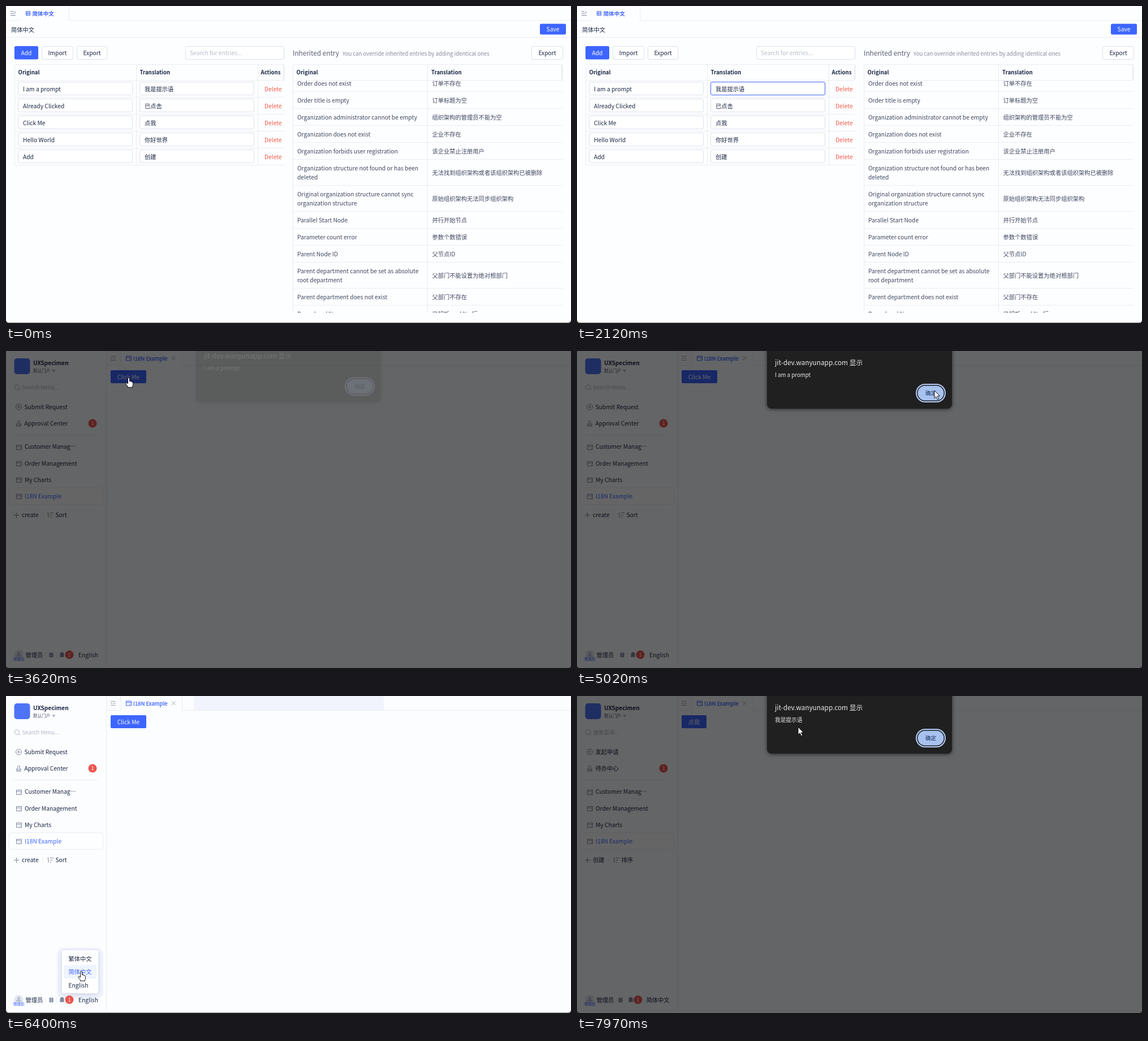
These frames come from a looping animation (999x561 px, 8000 ms). An HTML page:

```html
<!DOCTYPE html>
<html lang="zh-CN">
<head>
<meta charset="utf-8">
<style>
html, body { margin: 0; width: 100%; height: 100%; overflow: hidden; background: #222; }
svg { display: block; width: 999px; height: 561px; }
text { font-family: "Noto Sans CJK SC", "Noto Sans CJK", sans-serif; white-space: pre; }
</style>
</head>
<body>
<svg id="stage" viewBox="0 0 999 561"></svg>
<script>
const BLUE = '#3d65ff', INK = '#1b2644', CELL = '#3f475f', LINE = '#e9ecf3', EDGE = '#dde1ec', RED = '#ec5650', GREY = '#7f889f';

// yc is the middle of the capitals
const text = (x, yc, s, size = 10.27, fill = INK, extra = '') =>
  `<text x="${x}" y="${yc + size * .37}" font-size="${size}" fill="${fill}" ${extra}>${s}</text>`;
const bold = (x, yc, s, size, fill) => text(x, yc, s, size, fill, 'font-weight="700"');
const mid = (x, yc, s, size, fill) => text(x, yc, s, size, fill, 'text-anchor="middle"');
const rect = (x, y, w, h, fill, r = 0, extra = '') =>
  `<rect x="${x}" y="${y}" width="${w}" height="${h}" rx="${r}" fill="${fill}" ${extra}/>`;
const box = (x, y, w, h, stroke = EDGE, extra = '') =>
  rect(x + .5, y + .5, w - 1, h - 1, '#fff', 2.5, `stroke="${stroke}" ${extra}`);
const path = (d, stroke = GREY, w = 1, extra = '') =>
  `<path d="${d}" fill="none" stroke="${stroke}" stroke-width="${w}" ${extra}/>`;
const hline = (x1, x2, y) => path(`M${x1} ${y}H${x2}`, LINE);
const vline = (x, y1, y2) => path(`M${x} ${y1}V${y2}`, LINE);
const group = (id, body, extra = '') => `<g id="${id}" ${extra}>${body}</g>`;
const card = (x, y, c) => path(`M${x + .5} ${y - 4}h9v8h-9zM${x} ${y - 1.5}h10M${x + 6} ${y + 1.5}h2`, c);
const badge = (x, y) => `<circle cx="${x}" cy="${y}" r="7.5" fill="${RED}"/>` + mid(x, y, 1, 9, '#fff');

function editor() {
  const left = [['I am a prompt', '我是提示语'], ['Already Clicked', '已点击'], ['Click Me', '点我'],
    ['Hello World', '你好世界'], ['Add', '创建']];
  const right = [['Order does not exist', '订单不存在'], ['Order title is empty', '订单标题为空'],
    ['Organization administrator cannot be empty', '组织架构的管理员不能为空'],
    ['Organization does not exist', '企业不存在'],
    ['Organization forbids user registration', '该企业禁止注册用户'],
    ['Organization structure not found or has been|deleted', '无法找到组织架构或者该组织架构已被删除'],
    ['Original organization structure cannot sync|organization structure', '原始组织架构无法同步组织架构'],
    ['Parallel Start Node', '并行开始节点'], ['Parameter count error', '参数个数错误'],
    ['Parent Node ID', '父节点ID'],
    ['Parent department cannot be set as absolute|root department', '父部门不能设置为绝对根部门'],
    ['Parent department does not exist', '父部门不存在'], ['Parsed and %s', '已解析 and %s 行']];

  let s = rect(0, 0, 999, 561, '#fdfeff');
  s += hline(0, 25, 25.5) + hline(111, 999, 25.5) + vline(111.5, 0, 25) + hline(0, 999, 55.5);
  s += path('M8 9.5h5M8 13h6M8 16.5h9M14.5 9.5l2.5 2-2.5 2');
  s += path('M35.5 9.5h7v7h-7zM37 11.5h2v3h-2zM40 12h2M40 14h2', BLUE);
  s += bold(46.5, 13, '简体中文', 9.6, BLUE) + text(9, 42, '简体中文');
  s += rect(944, 31.5, 46, 19, BLUE, 2.5) + mid(967, 41, 'Save', 10.27, '#fff');
  s += rect(15, 71, 42, 23.5, BLUE, 2.5) + mid(36, 83, 'Add', 10.27, '#fff');
  s += box(63, 71, 56, 24) + mid(91, 83, 'Import');
  s += box(125, 71, 54, 24) + mid(152, 83, 'Export');
  s += box(317, 71, 175, 24) + text(325, 83, 'Search for entries...', 10.27, '#b6bccb');
  s += text(507, 83.5, 'Inherited entry', 11.75, '#565d70');
  s += text(595, 84, 'You can override inherited entries by adding identical ones', 9.55, '#858b99');
  s += box(929, 71, 56, 24) + mid(957, 83, 'Export');

  s += path('M15.5 281V106q0-2.5 2.5-2.5H492', LINE) + hline(15, 492, 131.5);
  s += vline(230.5, 104, 281) + vline(445.5, 104, 281) + rect(490, 105, 2.5, 26, LINE, 1);
  s += bold(21.5, 117, 'Original', 9.6) + bold(236.5, 117, 'Translation', 9.6) + bold(450.5, 117, 'Actions', 9.6);
  left.forEach(([a, b], i) => {
    const y = 131 + i * 30;
    s += hline(15, 492, y + 30.5) + box(21, y + 3, 203, 24);
    s += box(236, y + 3, 203, 24, EDGE, i ? '' : 'id="field"');
    s += text(30, y + 16, a) + text(245, y + 16, b) + text(457, y + 16, 'Delete', 10.27, '#f05a49');
  });
  s += rect(296, 139, 1, 15, '#111', 0, 'id="caret"');

  let y = 121.5, rows = '';
  for (const [a, b] of right) {
    const lines = a.split('|'), h = 14 + 16 * lines.length;
    lines.forEach((l, i) => rows += text(515, y + 15.5 + 16 * i, l, 10.27, CELL));
    rows += text(753.5, y + h / 2 + .5, b, 10.27, CELL);
    y += h;
    rows += hline(507, 984, y);
  }
  s += `<clipPath id="body"><rect x="500" y="132" width="490" height="411"/></clipPath><g clip-path="url(#body)">${rows}</g>`;
  s += path('M507.5 543V106q0-2.5 2.5-2.5H984', LINE) + hline(507, 984, 131.5) + vline(745.5, 104, 543);
  s += rect(982, 105, 2.5, 26, LINE, 1);
  return s + bold(513.5, 117, 'Original', 9.6) + bold(752, 117, 'Translation', 9.6);
}

function labels(zh) {
  const pick = (en, cn) => zh ? cn : en, d = zh ? -9 : 0, f = zh ? -3 : 0, w = pick(63, 44);
  let s = text(28.5, 64, pick('Search Menu...', '搜索菜单...'), 9.6, '#b0b6c6');
  s += text(32.5, 99, pick('Submit Request', '发起申请')) + text(32.5, 128, pick('Approval Center', '待办中心'));
  s += text(28, 290, pick('create', '创建')) + text(87.5 + d, 290, pick('Sort', '排序'));
  s += vline(65.5 + d, 286, 295);
  s += path(`M${75 + d} 286v9m-2-7l2-2M${78 + d} 286.5h6M${78 + d} 290.5h4M${78 + d} 294.5h2`);
  s += rect(76.5 + f, 534, 7, 8, GREY, 1) + path(`M${78.5 + f} 536h3m-3 2h3m-3 2h3`, '#fff', .8);
  s += `<path d="M${99 + f * 1.3} 533q3.5 0 3.5 4v3l1 1.5h-9l1-1.5v-3q0-4 3.5-4z" fill="${GREY}"/>`;
  s += badge(112 + f * 1.4, 537.5) + text(pick(128, 122.5), 538, pick('English', '简体中文'));
  s += rect(185, 34, w, 23, BLUE, 2, 'class="btn"');
  return s + mid(185 + w / 2, 46, pick('Click Me', '点我'), 10.27, '#fff');
}

function portal() {
  let s = rect(0, 0, 999, 561, '#fcfdff');
  s += rect(178, 0, 25, 25, '#fafbff') + rect(332, 0, 336, 25, '#f2f4fd', 0, 'id="tint"');
  s += rect(90, 446, 82, 90, '#f1f4fd', 12, 'id="menuTint"');
  s += vline(177.5, 0, 561) + hline(178, 203, 25.5) + hline(311, 999, 25.5) + vline(203.5, 0, 25) + vline(311.5, 0, 25);
  s += path('M185 9.5h9M189 13h5M185 16.5h9M188 11l-2.5 2 2.5 2', '#a3aabb');
  s += card(212, 13, BLUE) + text(225, 13, 'I18N Example', 9.55, BLUE, `stroke="${BLUE}" stroke-width=".25"`);
  s += path('M293 9.5l6.5 6.5m0-6.5L293 16', '#a3aabb');
  s += rect(14.5, 13, 28, 28, '#4f73f7', 5) + bold(48, 21, 'UXSpecimen', 10.1);
  s += text(48, 35, '默认门户', 7.5, '#4a5268') + '<path d="M81 33.5h6.5l-3.2 4z" fill="#aab0c0"/>';
  s += '<circle cx="19.5" cy="64" r="4.2" fill="none" stroke="#a9b0c1"/>' + path('M22.5 67l2.5 2.5', '#a9b0c1');
  s += `<circle cx="22.5" cy="99" r="5" fill="none" stroke="${GREY}"/>` + path('M20 99h5M22.5 96.5v5');
  s += path('M21 129q.5-1.500-.3-3a2 2 0 1 1 3.600 0q-.8 1.500-.3 3h2.500v2h-8v-2zM18 133h9') + badge(153, 128);
  s += hline(14, 162, 148.5);
  s += rect(5.5, 242, 166, 29.5, '#fdfeff', 4, `stroke="${LINE}"`);
  ['Customer Manag…', 'Order Management', 'My Charts', 'I18N Example'].forEach((l, i) => {
    const y = 169.5 + i * 29.3;
    s += card(18, Math.round(y) + .5, GREY) + text(33, y, l, 10.27, i == 3 ? BLUE : INK);
  });
  s += path('M14 290.500h9.500M18.500 286v9.500');
  s += '<circle cx="22.5" cy="537" r="8" fill="#e3e7f1"/><path d="M17 543q0-6 5.500-6t5.500 6z" fill="#b7bfd0"/><circle cx="22.500" cy="535" r="2.500" fill="#b7bfd0"/>';
  s += rect(11.5, 541, 22, 8, '#e3eaff', 2) + mid(22.5, 545, '管理员', 6, BLUE);
  s += text(34.5, 538, '管理员') + vline(69.5, 533, 543) + vline(89.5, 533, 543);
  s += group('en', labels(false)) + group('zh', labels(true));
  const menu = rect(99, 450, 64, 76, '#fff', 4, 'style="filter:drop-shadow(0 2px 5px #2a3c7030)"')
    + rect(102, 476, 58, 24, '#f0f4ff', 2, 'id="pick"') + text(110.5, 465, '繁体中文')
    + text(110.5, 488.5, '简体中文', 10.27, INK, 'id="choice"') + text(110.5, 512, 'English');
  return s + group('menu', menu);
}

const dialog = rect(336, -20, 327, 122, '#202020', 8, 'style="filter:drop-shadow(0 1px 3px #0009)"')
  + text(350, 20.5, 'jit-dev.wanyunapp.com 显示', 11.8, '#ececec')
  + text(350, 42, '', 9.7, '#ececec', 'id="message"')
  + rect(600, 59, 51, 31, 'none', 15.5, 'stroke="#b3cdf8" stroke-width="2"')
  + rect(602.5, 61.5, 46, 26, '#a8c2f0', 13) + mid(625.5, 74, '确定', 9.6, '#12305f');

const arrow = 'M0 0V13.500L3.100 10.600L5.600 16L7.800 15L5.400 9.700H9.500Z';
const hand = 'M-1.500 1Q-1.500-.5 0-.5T1.500 1V5.500Q3 4.800 4 6Q5.500 5.500 6 7Q7.500 6.800 7.500 8.500V11.500Q7.500 13 6.300 14.800V16.300H-1.500V14.800Q-3.500 13-5.300 9.300Q-4.500 7.300-1.500 9.800Z';

const $ = id => document.getElementById(id);
$('stage').innerHTML = '<clipPath id="win"><path d="M0 0H999V555Q999 560.500 993.500 560.500H5.500Q0 560.500 0 555Z"/></clipPath><g clip-path="url(#win)">'
  + group('editor', editor()) + group('portal', portal()) + rect(0, 0, 999, 561, '#000', 0, 'id="dim" opacity=".6"')
  + group('dialog', dialog) + '</g>'
  + '<path id="cursor" fill="#fff" stroke="#000" stroke-width=".9"/>';

// start, end, then a quadratic curve: from, control, to
const moves = [
  [390, 660, 330, 147, 520, 250, 700, 520],
  [810, 1140, 700, 520, 720, 545, 640, 575],
  [1640, 2120, 560, 240, 100, 190, 375, 14],
  [2900, 3350, 376, 17, 300, 110, 217, 48],
  [4270, 5020, 217, 48, 420, -28, 632, 70],
  [5470, 5890, 632, 70, 420, 230, 147, 540],
  [6070, 6400, 147, 540, 150, 510, 133, 488],
  [6580, 7360, 133, 488, 400, 300, 206, 46],
  [7910, 7970, 206, 46, 300, 44, 391, 55]];

const within = (t, a, b) => t >= a && t < b;
const clamp = v => Math.max(0, Math.min(1, v));
const show = (id, on) => $(id).setAttribute('display', on ? 'inline' : 'none');

function pointer(t) {
  const [a, b, x0, y0, x1, y1, x2, y2] = moves.filter(m => m[0] <= t).pop() || moves[0];
  const p = clamp((t - a) / (b - a)), u = p * p * (3 - 2 * p), v = 1 - u;
  const curve = (k, l, m) => v * v * k + 2 * u * v * l + u * u * m;
  return [curve(x0, x1, x2), curve(y0, y1, y2)];
}

function draw(t) {
  const zh = t >= 6670, inEditor = t < 2370;
  show('editor', inEditor);
  show('portal', !inEditor);
  show('en', !zh);
  show('zh', zh);

  $('field').setAttribute('stroke', t >= 390 ? BLUE : EDGE);
  show('caret', within(t, 390, 890) || within(t, 1390, 1890));

  const [x, y] = pointer(t);
  const onHand = within(t, 3300, 4300) || within(t, 5860, 6640) || within(t, 7320, 7910);
  show('cursor', within(t, 390, 1140) || within(t, 1640, 2100) || t >= 2900);
  $('cursor').setAttribute('d', onHand ? hand : arrow);
  $('cursor').setAttribute('transform', `translate(${x} ${y})`);

  const opened = t >= 7510 ? 7510 : 3620;
  const modal = within(t, 3620, 5230) || t >= 7510, closing = within(t, 5230, 5320);
  const p = clamp((t - opened) / 120);
  show('dim', modal);
  show('dialog', modal || closing);
  $('dialog').setAttribute('opacity', closing ? .6 * (1 - (t - 5230) / 90) : .12 + .88 * p);
  $('dialog').setAttribute('transform', `translate(0 ${modal ? -12 * (1 - p) ** 2 : 0})`);
  $('message').textContent = zh ? '我是提示语' : 'I am a prompt';
  const hover = !modal && (within(t, 3300, 3620) || within(t, 7320, 7510));
  document.querySelectorAll('.btn').forEach(b => b.setAttribute('fill', hover ? '#678aff' : BLUE));

  const chosen = y < 500;
  show('menu', within(t, 6070, 6700));
  $('menu').setAttribute('opacity', Math.min(clamp((t - 6040) / 120), clamp((6700 - t) / 120)));
  show('pick', chosen);
  $('choice').setAttribute('fill', chosen ? BLUE : INK);
  show('tint', within(t, 5320, 7510));
  show('menuTint', within(t, 6100, 7510));
}

const start = performance.now();
(function tick() {
  draw((performance.now() - start) % 8000);
  requestAnimationFrame(tick);
})();
</script>
</body>
</html>
```
